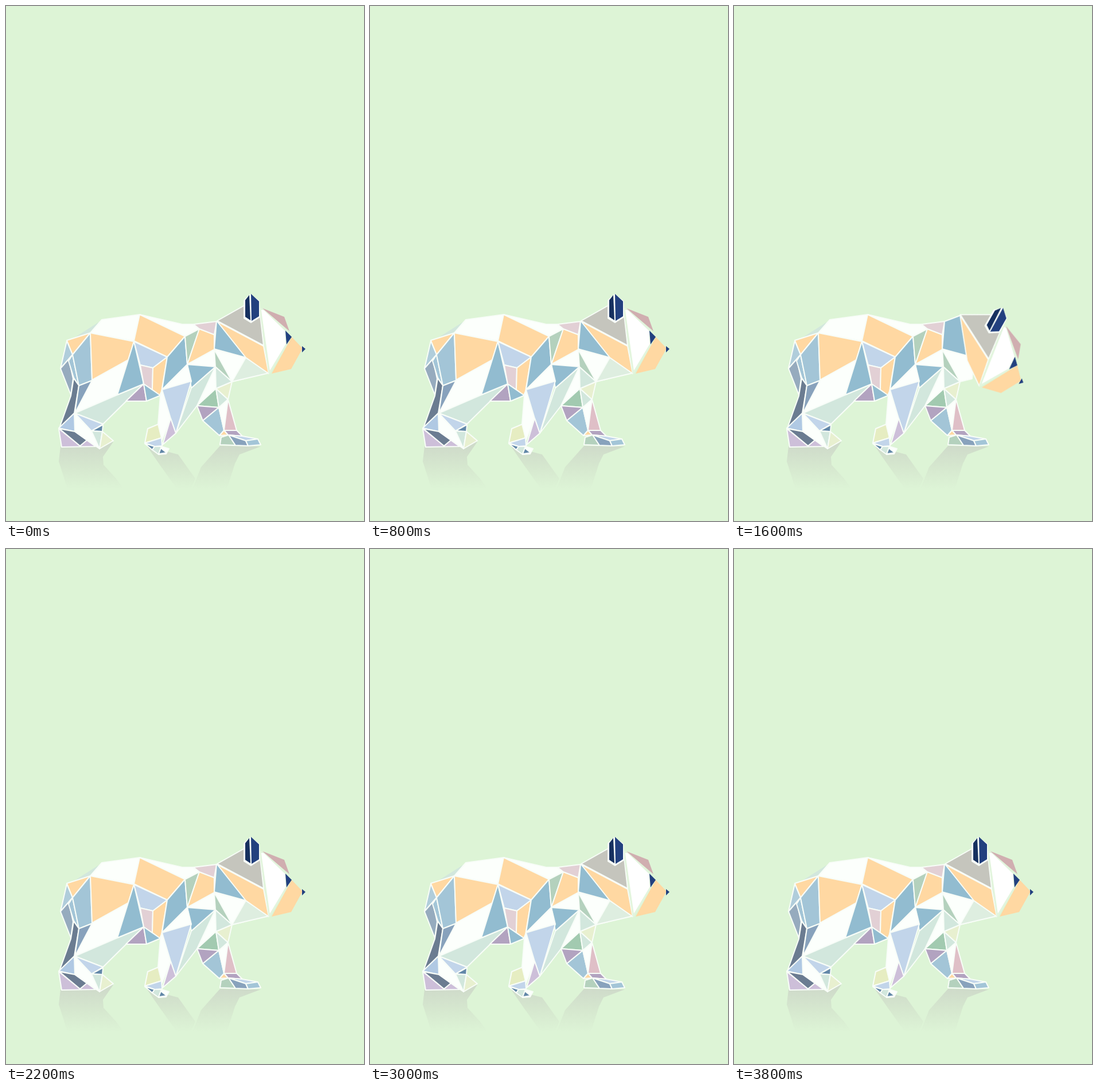
Recreate the animation shown at these times as an HTML page without scripts. Size 624 by 898 pixels, loop 4000 ms.

```html
<!DOCTYPE html>
<html lang="en">
<head>
<meta charset="utf-8">
<title>Low-poly bear</title>
<style>
html, body { margin: 0; width: 100%; height: 100%; overflow: hidden; background: #ddf4d6; }
svg { display: block; width: 100vw; height: 100vh; }

.facets polygon { stroke: #f8fdf8; stroke-width: 2; stroke-linejoin: round; }
.white { fill: #fcfffc; }
.orange { fill: #ffd8a2; }
.blue { fill: #92bcd0; }
.sky { fill: #a3c5d7; }
.peri { fill: #c2d5ea; }
.mist { fill: #d2e7dd; }
.sage { fill: #b4d1bd; }
.plum { fill: #b2a3c0; }
.lilac { fill: #cdbfd9; }
.rose { fill: #e2d0d5; }
.lemon { fill: #e8f0d0; }
.slate { fill: #6b7c91; }
.steel { fill: #88a2bc; }
.teal { fill: #6287a8; }
.gray { fill: #c5c5bd; }
.navy { fill: #22407f; }

.facets .bare { stroke: none; }
.facets .face { fill: #fff; stroke: #e3f5de; stroke-width: 3; }

.head, .ear, .chest, .leg, .shade, .edge { animation: 4s step-end infinite; }
.head { transform-origin: 401px 591px; animation-name: nod; }
.ear { animation-name: perk; }
.chest { animation-name: chest; }
.leg { transform-origin: 380px 655px; animation-name: step; }
.shade { animation-name: shade; }
.facets .edge { animation-name: edge; }

@keyframes nod {
  0%, 10%, 20%, 30%, 55%, 65%, 75%, 85%, 95%, 100% { transform: none; }
  5%, 15%, 25%, 60%, 70%, 80%, 90% { transform: rotate(-6deg); }
  35% { transform: rotate(23deg); }
  40%, 50% { transform: translateX(1.5px) rotate(29.5deg); }
  45% { transform: rotate(24.5deg); }
}
@keyframes perk {
  0%, 10%, 20%, 30%, 40%, 50%, 55%, 65%, 75%, 85%, 95%, 100% { transform: none; }
  5%, 15%, 25%, 60%, 70%, 80%, 90% { transform: translateY(-6px); }
  35%, 45% { transform: translate(-7px, -18px); }
}
@keyframes chest {
  0%, 55%, 100% { opacity: 1; }
  35% { opacity: 0; }
}
@keyframes step {
  0%, 10%, 20%, 30%, 55%, 65%, 75%, 85%, 95%, 100% { transform: none; }
  5%, 15%, 25%, 60%, 70%, 80%, 90% { transform: rotate(-3deg); }
}
@keyframes shade {
  0%, 10%, 20%, 30%, 55%, 65%, 75%, 85%, 95%, 100% { transform: none; }
  5%, 15%, 25%, 60%, 70%, 80%, 90% { transform: translateX(5px); }
}
@keyframes edge {
  0%, 90%, 100% { stroke-opacity: 1; }
  85% { stroke-opacity: 0; }
}
</style>
</head>
<body>
<svg viewBox="0 0 624 898">
  <defs>
    <linearGradient id="fade" gradientUnits="userSpaceOnUse" x1="0" y1="768" x2="0" y2="842">
      <stop offset="0" stop-color="#cfdbca"/>
      <stop offset=".5" stop-color="#d6e8cf"/>
      <stop offset="1" stop-color="#ddf4d6"/>
    </linearGradient>
  </defs>

  <!-- ground reflection -->
  <g fill="url(#fade)">
    <polygon points="95,768 187,760 169,786 170,800 192,824 205,842 107,842 92,794"/>
    <polygon points="246,768 300,782 330,824 322,842 298,842 268,800"/>
    <polygon class="shade" points="373,767 444,768 407,782 399,798 385,842 325,842 340,804"/>
  </g>

  <g class="facets">
    <!-- rump and hind leg -->
    <polygon class="mist bare" points="118,579 147,570 162,551"/>
    <polygon class="white" points="147,570 167,547 233,538 223,584"/>
    <polygon class="orange" points="106,583 147,570 116,608"/>
    <polygon points="106,584 116,608 95,632" fill="#b0cddb"/>
    <polygon points="95,632 116,608 110,618 117,650 113,678" fill="#96abbe"/>
    <polygon class="sky" points="116,608 127,662 118,648 109,619"/>
    <polygon class="sky" points="147,570 150,653 127,662 116,608"/>
    <polygon class="orange" points="147,570 223,585 213,617 150,652"/>
    <polygon class="white" points="150,652 213,617 194,678 120,710"/>
    <polygon class="mist" points="240,659 169,729 120,710 194,678"/>
    <polygon class="blue" points="223,585 240,659 194,678"/>
    <polygon class="slate" points="118,649 127,662 119,710 93,736 113,680"/>
    <polygon class="steel" points="127,662 150,653 120,710"/>
    <polygon points="119,710 92,736 120,742" fill="#b0c9e3"/>
    <polygon class="lilac" points="92,737 129,767 141,757 156,768 97,769"/>
    <polygon class="slate" points="93,737 120,742 141,757 129,767"/>
    <polygon class="white" points="120,710 149,741 163,772 141,757 120,742"/>
    <polygon class="peri" points="120,710 169,729 149,741"/>
    <polygon class="teal" points="149,741 169,730 168,742"/>
    <polygon class="mist" points="149,741 168,742 163,772"/>
    <polygon class="lemon" points="168,742 187,758 163,772"/>

    <!-- trunk -->
    <polygon class="white" points="233,538 307,555 327,555 337,563 312,576"/>
    <polygon class="orange" points="233,538 312,576 281,612 223,584"/>
    <polygon class="peri" points="223,585 281,612 256,631 234,626"/>
    <polygon class="rose" points="234,626 256,631 255,669 240,659"/>
    <polygon class="orange" points="256,631 281,612 271,672 268,679 255,669"/>
    <polygon class="plum" points="240,659 245,689 209,689"/>
    <polygon class="blue" points="240,659 269,679 245,689"/>
    <polygon class="blue" points="312,576 316,625 272,669 281,612"/>
    <polygon class="sage" points="312,576 337,563 316,625"/>
    <polygon class="orange" points="337,563 363,573 363,600 316,625"/>
    <polygon class="rose" points="327,555 367,550 363,573 337,563"/>
    <polygon class="white" points="316,625 363,599 365,629"/>

    <!-- near front leg -->
    <polygon class="white" points="365,629 366,667 333,697"/>
    <polygon class="mist" points="365,629 333,697 296,745 323,666"/>
    <polygon class="blue" points="316,625 365,629 323,666"/>
    <polygon class="white" points="272,669 316,625 323,654"/>
    <polygon points="247,737 266,729 271,753 242,762" fill="#e6edc2"/>
    <polygon class="white" points="269,679 272,669 287,719 272,757 265,729"/>
    <polygon class="peri" points="272,669 323,654 296,745 287,719"/>
    <polygon class="lilac" points="287,719 296,745 273,765"/>
    <polygon class="peri" points="242,762 271,753 272,767 259,768"/>
    <polygon class="teal" points="242,763 259,768 255,774"/>
    <polygon class="mist" points="255,774 259,768 271,768 266,782"/>
    <polygon class="white" points="271,768 284,772 279,781 266,782"/>
    <polygon class="teal" points="270,771 280,779 266,781"/>

    <!-- far front leg -->
    <g class="leg">
      <polygon points="366,667 371,700 333,697" fill="#a2cab0"/>
      <polygon class="plum" points="333,697 371,700 343,723"/>
      <polygon class="sky" points="371,700 380,740 372,749 343,723"/>
      <polygon class="mist" points="387,686 371,700 366,667"/>
      <polygon class="white" points="387,686 371,700 380,740"/>
      <polygon class="edge" points="387,686 402,740 380,740" fill="#dfbfc7"/>
      <polygon class="lemon edge" points="366,667 394,655 387,686"/>
      <polygon class="plum" points="380,740 402,740 412,750 387,748"/>
      <polygon class="orange" points="380,740 387,748 372,749"/>
      <polygon class="sage" points="388,748 400,766 373,765 375,752"/>
      <polygon class="peri" points="388,748 412,750 439,755 418,758"/>
      <polygon class="steel" points="388,748 418,758 422,767 400,766"/>
      <polygon class="sky" points="418,758 439,755 444,765 422,767"/>
    </g>

    <!-- shoulder and chest -->
    <polygon class="mist" points="365,629 394,655 366,667"/>
    <polygon class="white" points="363,599 418,613 415,650 394,655"/>
    <polygon class="sage" points="363,599 394,655 365,629"/>
    <polygon class="blue" points="367,550 396,539 418,613 363,598"/>
    <polygon class="chest" points="418,613 458,640 394,655" fill="#deeee0"/>

    <!-- neck and head -->
    <g class="head">
      <polygon class="orange" points="368,550 449,593 458,641 418,613"/>
      <polygon class="gray" points="368,549 414,523 442,530 449,592"/>
      <polygon class="face" points="443,528 450,529 488,566 489,590 459,640"/>
      <polygon class="bare" points="447,527 485,542 494,567" fill="#d0aeb0"/>
      <polygon class="orange bare" points="498,577 517,597 497,633 463,641"/>
      <polygon class="navy bare" points="487,566 498,577 489,590"/>
      <polygon class="navy bare" points="516,593 522,598 516,604"/>
      <g class="ear">
        <polygon class="bare" points="414,513 426,502 442,514 443,543 427,553 414,545" fill="#f8fdf8"/>
        <polygon class="bare" points="417,513 424,504 426,548 417,542" fill="#16305f"/>
        <polygon class="navy bare" points="427,502 441,515 441,541 428,549"/>
      </g>
    </g>
  </g>
</svg>
</body>
</html>
```
